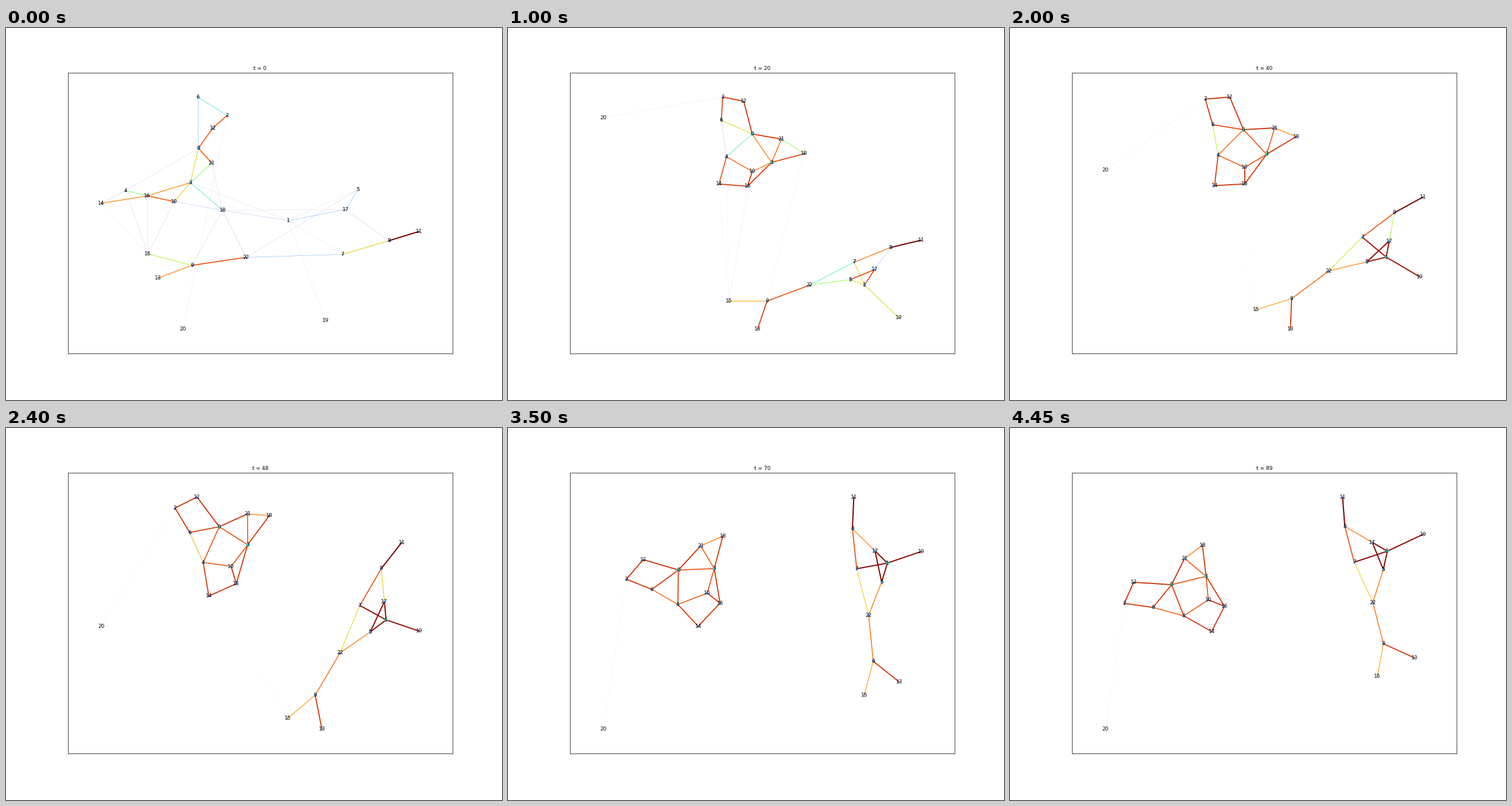
Recreate the animation shown at these times as a matplotlib script. Size 864 px wide and 648 px high, loop 4500 ms.

```python
import numpy as np
import matplotlib.pyplot as plt
from matplotlib.animation import FuncAnimation
from matplotlib.collections import LineCollection

FRAMES, INTERVAL = 90, 50
DPI = 54
PX = 72 / DPI                                  # points per pixel
LEFT, RIGHT, TOP, BOTTOM = 108, 777.6, 77.76, 567
CENTRE = np.array([LEFT + RIGHT, TOP + BOTTOM]) / 2
REACH = np.array([RIGHT - LEFT, BOTTOM - TOP]) / 2 / 1.1 ** 2
MAX_WIDTH = 2.1                                # pixels, at full weight
SETTLE_TIME, SETTLED_AT = 10, 56

plt.rcParams["font.family"] = "DejaVu Sans"
cmap = plt.get_cmap("turbo")


def points(*xy):
    return np.reshape(xy, (-1, 2)).astype(float)


# The tangled layout at the start and the untangled one, nodes 0 to 22
start = points(
    335, 209, 491, 335, 385, 152, 321, 269, 208, 283, 613, 281,
    334, 120, 586, 394, 667, 370, 324, 413, 293, 302, 719, 354,
    360, 174, 265, 435, 166, 305, 247, 393, 246, 292, 591, 316,
    377, 317, 556, 509, 308, 524, 358, 235, 418, 399)
settled = points(
    333, 185, 660, 278, 248, 175, 390, 203, 321, 262, 640, 311,
    285, 213, 609, 265, 626, 182, 580, 462, 371, 254, 647, 120,
    281, 141, 608, 524, 346, 323, 546, 522, 388, 284, 648, 244,
    414, 135, 719, 282, 166, 452, 376, 144, 600, 367)
NODES = len(start)

# Three corner nodes steer each cluster; the loner moves by itself
LONER = 20
CORNERS = [2, 18, 14], [11, 19, 13]
GUIDES = [*CORNERS[0], *CORNERS[1], LONER]
CLUSTER = [0, 2, 3, 4, 6, 10, 12, 14, 16, 18, 21]
CLUSTERS = CLUSTER, [n for n in range(NODES) if n not in CLUSTER + [LONER]]

paths = {
    0: start[GUIDES],
    12: points(344, 120, 476, 231, 335, 279,
               719, 378, 633, 522, 424, 524, 166, 205),
    27: points(385, 120, 523, 216, 356, 271,
               719, 355, 709, 491, 419, 524, 166, 170),
    40: points(340, 120, 498, 186, 356, 272,
               719, 292, 713, 432, 488, 524, 166, 245),
    SETTLED_AT: settled[GUIDES],
    70: points(206, 263, 374, 188, 331, 345,
               602, 120, 719, 215, 681, 442, 166, 524),
    89: points(199, 305, 335, 204, 351, 354,
               579, 120, 719, 185, 704, 400, 166, 524),
}
times = np.array(list(paths), float)
keys = np.array(list(paths.values()))
slopes = np.gradient(keys, times, axis=0)


def shape_of(layout):
    """Each node as a weighted mean of its cluster's corners."""
    shape = np.zeros((NODES, len(GUIDES)))
    flat = np.column_stack([layout, np.ones(NODES)])
    for k, (corners, members) in enumerate(zip(CORNERS, CLUSTERS)):
        shape[members, 3 * k:3 * k + 3] = (
            flat[members] @ np.linalg.inv(flat[corners]))
    shape[LONER, -1] = 1
    return shape


start_shape, settled_shape = shape_of(start), shape_of(settled)


def guides_at(t):
    """Cubic path of the guide nodes through their key points."""
    i = min(np.searchsorted(times, t, side="right") - 1, len(times) - 2)
    span = times[i + 1] - times[i]
    u = (t - times[i]) / span
    ease = u * u * (3 - 2 * u)
    return (keys[i] * (1 - ease) + keys[i + 1] * ease
            + span * u * (1 - u) * (slopes[i] * (1 - u) - slopes[i + 1] * u))


def layout_at(t):
    left = np.exp(-t / SETTLE_TIME)
    shape = start_shape * left + settled_shape * (1 - left)
    xy = shape @ guides_at(t)
    low, high = xy.min(axis=0), xy.max(axis=0)
    return CENTRE + REACH * (2 * (xy - low) / (high - low) - 1)


edges, weight_of = [], []


def fade(weight, life, *pairs):
    """Edges that die away."""
    for pair in pairs:
        edges.append(pair)
        weight_of.append(lambda t: weight * np.exp(-t / life))


def link(first, last, half, *pairs):
    """Edges that go from one weight to another, half way at time half."""
    for pair in pairs:
        edges.append(pair)
        weight_of.append(
            lambda t: first + (last - first) * t**4 / (t**4 + half**4))


fade(.10, 5, (10, 18), (1, 18), (18, 22))
fade(.04, 5, (1, 3), (17, 18))
fade(.06, 14, (9, 18), (4, 15), (10, 15), (15, 16))
fade(.02, 25, (14, 15))
fade(.03, 80, (2, 20))

link(0, .80, 33, (4, 6))
link(.03, .98, 18, (1, 5), (1, 7), (1, 19))
link(.05, .75, 18, (18, 21), (5, 22))
link(.05, .86, 24, (0, 4))
link(.08, .76, 35, (8, 17))
link(.10, .86, 10, (4, 14))
link(.18, .63, 24, (7, 22))
link(.20, .86, 18, (0, 6))
link(.20, .98, 14, (1, 17), (5, 17))
link(.30, .87, 10, (2, 6), (3, 18))
link(.43, .80, 11, (3, 21), (4, 10))
link(.52, .69, 12, (9, 15))
link(.62, .82, 18, (0, 3), (3, 10), (7, 8))
link(.72, .87, 12, (3, 16), (14, 16), (9, 13))
link(.82, .76, 30, (9, 22))
link(.80, .88, 12, (0, 12), (0, 21), (2, 12), (10, 16))
link(1, 1, 1, (8, 11))

edges = np.array(edges)

fig = plt.figure(figsize=(864 / DPI, 648 / DPI), dpi=DPI, facecolor="white")
ax = fig.add_axes([LEFT / 864, 1 - BOTTOM / 648,
                   (RIGHT - LEFT) / 864, (BOTTOM - TOP) / 648])
ax.set(xlim=(LEFT, RIGHT), ylim=(BOTTOM, TOP), xticks=[], yticks=[])
for spine in ax.spines.values():
    spine.set_linewidth(1)
title = ax.set_title("", fontsize=12)

lines = LineCollection([], zorder=1)
ax.add_collection(lines, autolim=False)
dots = ax.scatter(*start.T, linewidths=0, zorder=2)
labels = [ax.text(0, 0, str(n), fontsize=12, ha="center", va="center")
          for n in range(NODES)]


def draw(t):
    xy = layout_at(t)
    weights = np.array([weight(t) for weight in weight_of])
    lines.set_segments(xy[edges])
    lines.set_color(cmap(weights))
    lines.set_linewidth(weights * MAX_WIDTH * PX)

    strength = np.bincount(edges.ravel(), np.repeat(weights, 2),
                           minlength=NODES)
    dots.set_offsets(xy)
    dots.set_sizes(11 * strength)
    dots.set_facecolor(cmap(strength / 13))
    for label, point in zip(labels, xy):
        label.set_position(point)
    title.set_text(f"t = {t}")
    return [lines, dots, title, *labels]


anim = FuncAnimation(fig, draw, frames=FRAMES, interval=INTERVAL,
                     repeat=True, repeat_delay=0)
plt.show()
```
